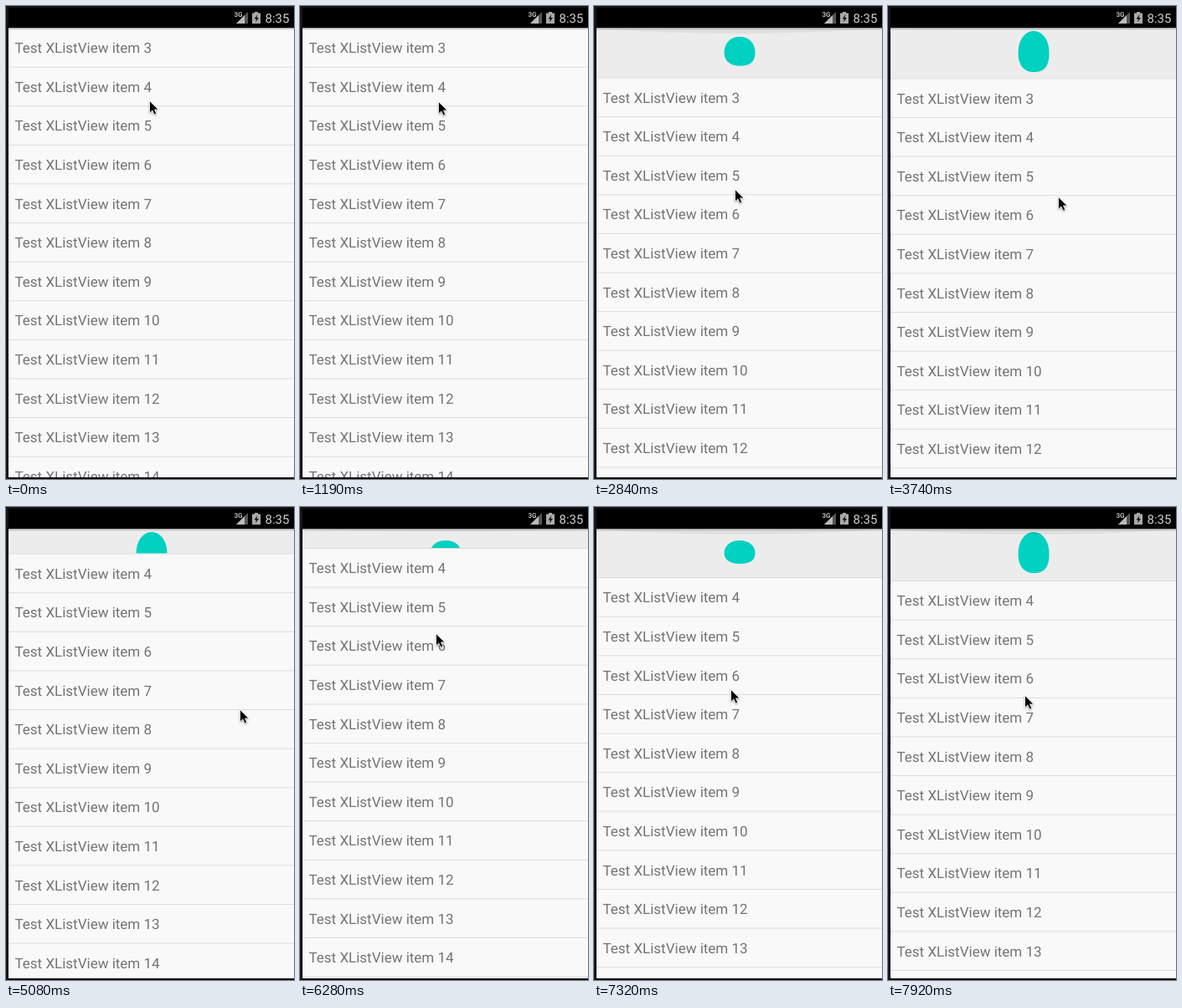
These frames come from a looping animation (344 by 566 pixels, 8000 ms). An HTML page:

```html
<!DOCTYPE html>
<html lang="en">
<head>
<meta charset="utf-8">
<title>Pull to refresh list</title>
<style>
html, body { margin: 0; width: 100%; height: 100%; overflow: hidden; background: #161616; }
svg { display: block; width: 100vw; height: 100vh; }
text { font-family: Roboto, sans-serif; text-rendering: geometricPrecision; }
#rows text { font-size: 17px; fill: #747474; }
#cursor { filter: drop-shadow(0 1px 1px rgba(0, 0, 0, .35)); }
</style>
</head>
<body>
<svg viewBox="0 0 344 566">
  <defs>
    <linearGradient id="shade" x2="0" y2="1">
      <stop offset="0" stop-opacity=".3"/>
      <stop offset="1" stop-opacity="0"/>
    </linearGradient>
  </defs>
  <rect x="3" y="26" width="341" height="538" fill="#ececec"/>
  <path id="blob" fill="#00d1c1"/>
  <g id="list">
    <rect x="3" width="341" height="566" fill="#f9f9f9"/>
    <g id="rows"></g>
  </g>
  <path id="glow" fill-opacity=".05"/>
  <rect y="564" width="344" height="2" fill="#0a0a0a"/>
  <path d="M0 0H344V2H3V566H0Z" fill="#161616"/>
  <rect x="3" y="2" width="341" height="24"/>
  <rect x="3" y="26" width="341" height="3" fill="url(#shade)"/>
  <text x="272.5" y="13" font-size="8" font-weight="700" fill="#bbb">3G</text>
  <path d="M289 7V21H275Z" fill="#555"/>
  <path d="M285 11V21H275Z" fill="#bbb"/>
  <path d="M297 7h4v1.5h3V21h-10V8.5h3Z" fill="#aaa"/>
  <path d="M300.5 10l-4 5.5h2.5l-1 4 4-5.5h-2.5Z" fill="#111"/>
  <text x="309.5" y="20" font-size="15" fill="#cfcfcf">8:35</text>
  <path id="cursor" d="M.5.5V15L3.9 11.9 6.1 17 8.7 15.9 6.5 10.9H11Z"
    stroke="#fff" stroke-width=".8" stroke-linejoin="round"/>
</svg>
<script>
const LOOP = 8000, TICK = 3440 / 23;
const TOP = 26, PITCH = 46.6, ROWS = 13;
const REFRESHED = 4930, COLLAPSED = 5360;
const $ = id => document.getElementById(id);

const ramp = (t, from, to) => Math.min(1, Math.max(0, (t - from) / (to - from)));
const easeOut = p => 1 - (1 - p) ** 2;

function make(tag, attrs) {
  const el = document.createElementNS("http://www.w3.org/2000/svg", tag);
  for (const k in attrs) el.setAttribute(k, attrs[k]);
  return $("rows").appendChild(el);
}

const labels = Array.from({ length: ROWS }, (_, k) => {
  make("rect", { x: 3, y: PITCH * k, width: 341, height: 1, fill: "#dcdcdc" });
  return make("text", { x: 10.5, y: 30.2 + PITCH * k });
});

// The flat drop (m = 0) grows into a tall one (m = 1).
function blobPath(m) {
  const top = 40 - 10 * m, bottom = 68 + 11 * m, h = bottom - top;
  const mid = top + h * 0.54, left = 155.5, right = 192.5, c = 174;
  return `M${left} ${mid}C${left} ${top + h * 0.2} ${c - 10} ${top} ${c} ${top}` +
    `S${right} ${top + h * 0.2} ${right} ${mid}S${c + 12} ${bottom} ${c} ${bottom}` +
    `S${left} ${bottom - h * 0.18} ${left} ${mid}Z`;
}

function pointerAt(t, drag1, drag2) {
  const nudge = ramp(t, 0, 290), lift = ramp(t, 440, 740);
  const leave = ramp(t, 3290, 4700), back = ramp(t, 5080, 5700);
  const x = 171 - 3 * nudge - 4 * lift + 4 * drag1 + 111 * leave - 118 * back + 2 * drag2;
  const y = 113 + 2 * nudge - 18 * lift + 124 * drag1 + 21 * leave - 135 * back + 118 * drag2;
  return [Math.round(x), Math.round(y)];
}

function draw(t) {
  const opened = 60.4 * ramp(t, 1192, 2865);
  const collapse = easeOut(ramp(t, COLLAPSED - 400, COLLAPSED));
  const drag1 = ramp(t, 931, 2865), drag2 = easeOut(ramp(t, 5883, 7800));
  const reopened = 62 * drag2;

  const y = TOP + opened * (1 - collapse) + reopened;
  const first = t < REFRESHED ? 3 : 4;
  $("list").setAttribute("transform", `translate(0 ${y})`);
  labels.forEach((el, k) => el.textContent = `Test XListView item ${first + k}`);

  const grown = t < COLLAPSED ? ramp(t, 2690, 3140) : ramp(t, 7320, 7620);
  $("blob").setAttribute("d", blobPath(grown));

  const depth = (opened * (1 - ramp(t, 3140, 3900)) + reopened) / 10;
  $("glow").setAttribute("d", depth ? `M3 26V27Q173 ${27 + 2 * depth} 344 27V26Z` : "");

  $("cursor").setAttribute("transform", `translate(${pointerAt(t, drag1, drag2)})`);
}

// The screen refreshes in even ticks, with times cut to 10 ms.
const tickTime = k => Math.floor(k * TICK / 10 + 1e-6) * 10;

function frame() {
  const t = performance.now() % LOOP;
  let k = Math.floor(t / TICK) + 1;
  while (tickTime(k) > t) k--;
  draw(tickTime(k));
  requestAnimationFrame(frame);
}
frame();
</script>
</body>
</html>
```
